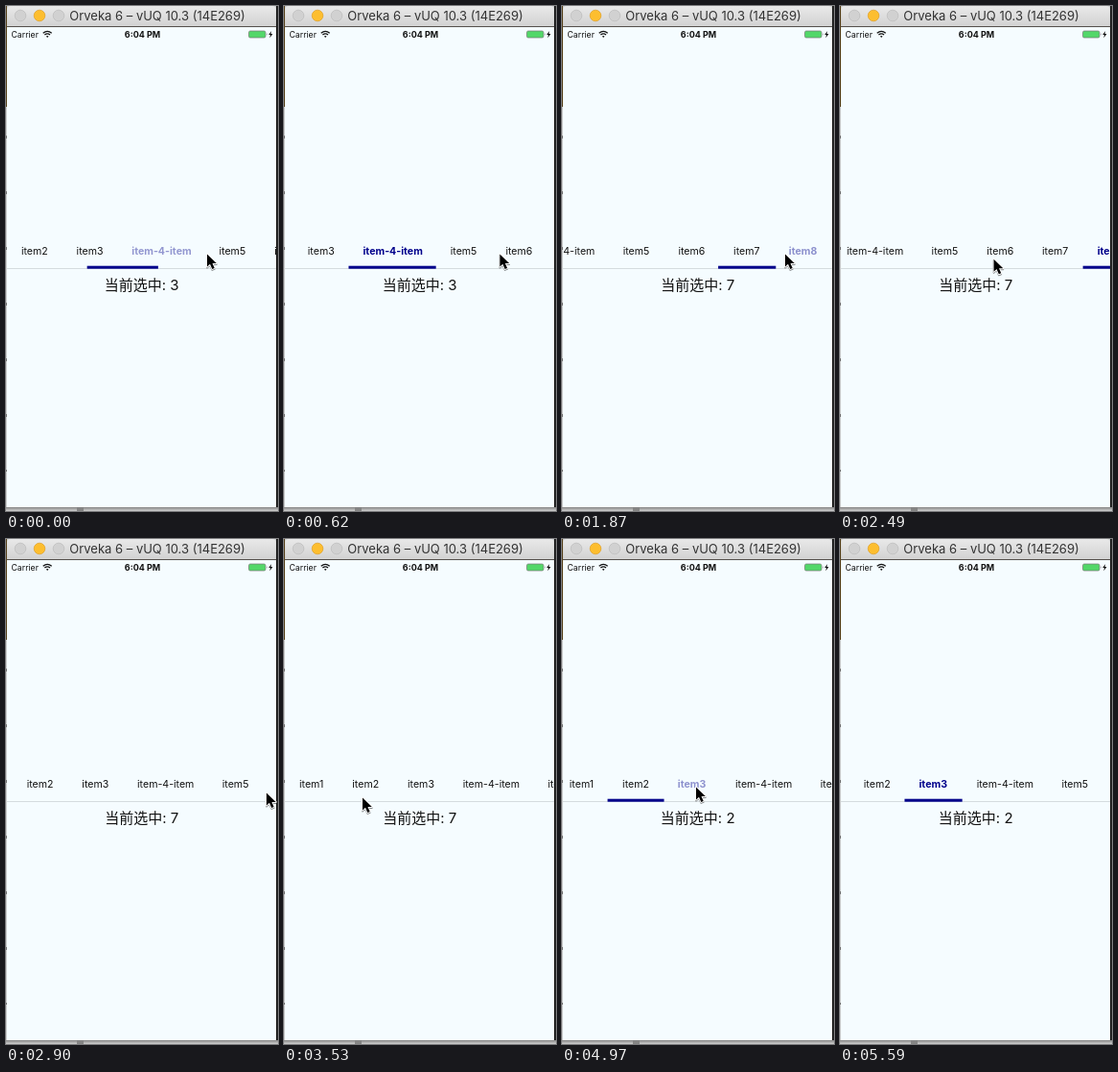
Recreate the animation shown at these times as an HTML page. Size 284 by 526 pixels, loop 6220 ms.

```html
<!DOCTYPE html>
<html lang="zh">
<head>
<meta charset="utf-8">
<style>
  html, body { margin: 0; width: 100%; height: 100%; overflow: hidden; background: #f5fcff; }
  svg { display: block; width: 284px; height: 526px; font-family: Inter, "Noto Sans CJK SC", "Noto Sans CJK", sans-serif; }
  .tab { font-size: 10.6px; fill: #111; }
  .tab.on { font-weight: 700; fill: #00008b; }
  #cursor { filter: drop-shadow(0 1px .7px rgba(0, 0, 0, .45)); }
</style>
</head>
<body>
<svg viewBox="0 0 284 526">
  <defs>
    <linearGradient id="bar" x2="0" y2="1">
      <stop stop-color="#e9e9e9"/><stop offset="1" stop-color="#d1d1d1"/>
    </linearGradient>
    <linearGradient id="shade" x2="0" y2="1">
      <stop stop-color="#858585"/><stop offset="1" stop-color="#cfcfcf"/>
    </linearGradient>
    <clipPath id="view"><rect x="1" y="22" width="281" height="500"/></clipPath>
  </defs>

  <!-- desktop showing around the window -->
  <rect width="284" height="526" fill="#cfd1d2"/>
  <path d="M0 0h1v105h-1z" fill="#5a451f"/>
  <path d="M.5 135v350" stroke="#777" stroke-dasharray="3 55"/>
  <path d="M282 0h2v522h-2z" fill="#222"/>
  <path d="M0 522h284v4h-284z" fill="url(#shade)"/>
  <path d="M74 522h7v4h-7z" fill="#858585"/>

  <rect x="1" y="21" width="281" height="501" fill="#f5fcff"/>
  <path d="M1 22V4q0-4 4-4h273q4 0 4 4v18z" fill="url(#bar)"/>
  <path d="M1 21.5h281" stroke="#55504c"/>
  <g fill="#d1d1d1" stroke="#bcbcbc" stroke-width=".7">
    <circle cx="15" cy="10" r="5.8"/>
    <circle cx="35" cy="10" r="5.8" fill="#fdbe2f" stroke="#e0a025"/>
    <circle cx="55" cy="10" r="5.8"/>
  </g>
  <text x="158" y="15" font-size="13" fill="#333" text-anchor="middle">Orveka 6 – vUQ 10.3 (14E269)</text>

  <g fill="#111">
    <text x="5.5" y="32.7" font-size="8.7">Carrier</text>
    <path d="M38.7 28.2q4.5-3.8 9 0M40.4 30q2.8-2.3 5.6 0" fill="none" stroke="#111" stroke-width="1.3"/>
    <path d="M43.2 32.9l-1.3-1.5q1.3-1 2.6 0z"/>
    <text x="142.5" y="32.7" font-size="9" font-weight="700" text-anchor="middle">6:04 PM</text>
    <rect x="253.5" y="26" width="17.5" height="7" rx="1.5" fill="#53d769" stroke="#777" stroke-width=".7"/>
    <path d="M272 28.2q1.2 1.3 0 2.6z" fill="#777"/>
    <path d="M277.2 26l-3 4h1.9l-.8 3.2 3.2-4.2h-2z"/>
  </g>

  <path d="M1 273.5h281" stroke="#d5dcdf"/>
  <g clip-path="url(#view)">
    <g id="tabs"></g>
    <rect id="line" y="270.7" height="3" fill="#00008b"/>
  </g>
  <text id="label" x="141.7" y="296.2" font-size="15" fill="#111" text-anchor="middle"></text>
  <path id="cursor" d="M1 1.500V14.500l3-2.700 2.300 5.200 2.400-1-2.200-5h4.300z" stroke="#fff" stroke-width="1.800" stroke-linejoin="round" paint-order="stroke"/>
</svg>
<script>
const LOOP = 6220, STEP = 207;
const LEFT = 1, VIEW = 281, PAD = 15, LEAD = 66.5;
const names = Array.from({ length: 8 }, (_, i) => i === 3 ? "item-4-item" : "item" + (i + 1));

// a tap selects a tab; the drag returns to the start of the list
const FIRST_TAB = 2;
const events = [
  { at: -88, tab: 3 },
  { at: 928, tab: 5 },
  { at: 1769, tab: 7 },
  { at: 2150, drag: 1150 },
  { at: 3840, tab: 0 },
  { at: 4875, tab: 2 },
];
// time, x, y
const cursorPath = [
  [0, 209, 257], [928, 232, 257], [1900, 232, 257], [2300, 110, 262], [2898, 271, 263],
  [3519, 81, 268], [3840, 30, 257], [4347, 87, 252], [4875, 139, 257],
];
const CURSOR_END = 5580;

const $ = id => document.getElementById(id);
const mix = (a, b, p) => a + (b - a) * p;
const clamp = (v, lo, hi) => Math.min(hi, Math.max(lo, v));
const smoother = v => { const p = clamp(v, 0, 1); return p ** 3 * (p * (6 * p - 15) + 10); };
const inOutQuad = v => { const p = clamp(v, 0, 1); return p < .5 ? 2 * p * p : 1 - 2 * (1 - p) ** 2; };

// damped spring from 0 to 1
function spring(ms) {
  const t = ms / 1000, decay = 11, omega = 10.45;
  return 1 - Math.exp(-decay * t) * (Math.cos(omega * t) + decay / omega * Math.sin(omega * t));
}

function tabWidth(i, bold) {
  const text = 5.17 * names[i].length + 1.85 - (i === 0 ? 2.4 : 0);
  return text + 2 * PAD + (bold ? 2.5 : 0);
}

function layout(selected) {
  let end = 0;
  const starts = names.map((_, i) => {
    const start = end;
    end += tabWidth(i, i === selected);
    return start;
  });
  return { starts, max: end - VIEW };
}

function scrollFor(tab) {
  const { starts, max } = layout(tab);
  return clamp(starts[tab] - LEAD, 0, max);
}

function stateAt(time) {
  const state = { scroll: scrollFor(FIRST_TAB), selected: FIRST_TAB };
  for (const { at, tab, drag } of events) {
    if (at > time) break;
    const goal = drag ? 0 : scrollFor(tab);
    state.scroll = mix(state.scroll, goal, smoother((time - at) / (drag || 300)));
    if (!drag) Object.assign(state, { previous: state.selected, selected: tab, age: time - at });
  }
  return state;
}

function cursorAt(time) {
  const next = cursorPath.findIndex(point => point[0] > time);
  if (next < 0) return cursorPath[cursorPath.length - 1].slice(1);
  const a = cursorPath[next - 1], b = cursorPath[next];
  const p = (time - a[0]) / (b[0] - a[0]);
  return [mix(a[1], b[1], p), mix(a[2], b[2], p)];
}

const tabs = names.map(name => {
  const el = document.createElementNS("http://www.w3.org/2000/svg", "text");
  el.textContent = name;
  el.setAttribute("y", 259);
  $("tabs").append(el);
  return el;
});

function draw(elapsed) {
  // the screen refreshes once per step
  const time = Math.floor(elapsed % LOOP / STEP) * STEP;
  const { scroll, selected, previous, age } = stateAt(time);
  const starts = layout(selected).starts.map(x => x + LEFT - scroll);

  tabs.forEach((el, i) => {
    const on = i === selected;
    el.setAttribute("class", on ? "tab on" : "tab");
    el.setAttribute("x", starts[i] + PAD);
    el.setAttribute("opacity", on ? mix(.2, 1, inOutQuad(age / 250)) : 1);
  });

  const p = spring(age);
  $("line").setAttribute("x", mix(starts[previous], starts[selected], p));
  $("line").setAttribute("width", mix(tabWidth(previous, true), tabWidth(selected, true), p));
  $("label").textContent = "当前选中: " + selected;

  $("cursor").setAttribute("transform", `translate(${cursorAt(time)})`);
  $("cursor").setAttribute("visibility", time < CURSOR_END ? "visible" : "hidden");
}

const begin = performance.now();
function tick() {
  draw(performance.now() - begin);
  requestAnimationFrame(tick);
}
tick();
</script>
</body>
</html>
```
